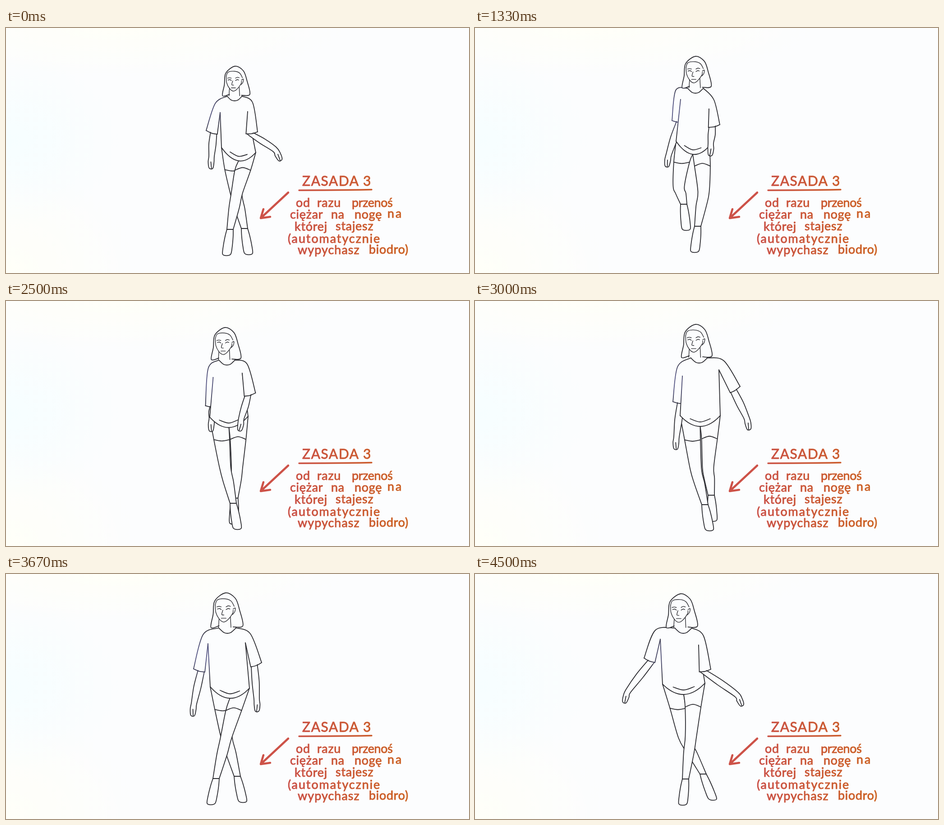
Write an HTML page with a canvas that moves like this. It is 1027 px wide and 545 px high and loops after 4670 ms.

```html
<!DOCTYPE html>
<html lang="pl">
<meta charset="utf-8">
<title>Zasada 3</title>
<style>
html, body { margin: 0; width: 100%; height: 100%; overflow: hidden; }
body {
  background:
    radial-gradient(ellipse 260px 190px at 0 250px, #f6feff, #f6feff00),
    radial-gradient(ellipse 520px 110px at 250px 0, #fffff8, #fffff800),
    radial-gradient(ellipse 300px 240px at 0 545px, #fffff8, #fffff800),
    #fcfdfe;
}
canvas, svg { position: absolute; left: 0; top: 0; width: 1027px; height: 545px; }
text { font: 27px Lato, "Open Sans", sans-serif; }
</style>
<canvas id="stage" width="1027" height="545"></canvas>
<svg viewBox="0 0 1027 545" stroke-linecap="round" stroke-linejoin="round">
  <linearGradient id="ink" gradientUnits="userSpaceOnUse" x1="625" x2="890" y1="0" y2="0">
    <stop stop-color="#ca4f46"/><stop offset="1" stop-color="#cc6222"/>
  </linearGradient>
  <g id="note" fill="url(#ink)" stroke="url(#ink)" stroke-width=".9">
    <path fill="none" stroke-width="3.4" d="M650 361Q730 361 811 359.5"/>
    <path fill="none" stroke="#cd5248" stroke-width="4.6" d="M626 366L566 422M571 403L565 423L586 420"/>
    <text x="657" y="351" style="font-size:30px;letter-spacing:1.6px">ZASADA 3</text>
  </g>
</svg>
<script>
// Joints of the walker in each key pose; pairs run left, right as seen
const joints = 'head neck shoulderL shoulderR cuffL cuffR wristL wristR hemL hemR kneeL kneeR ankleL ankleR'.split(' ');
const poses = [
  '508,85 507,162 464,168 547,166 444,228 558,231 456,285 596,270 478,266 554,277 511,372 512,368 529,446 497,448',
  '494,77 496,154 446,151 540,162 423,216 551,226 408,277 613,240 457,260 537,259 489,360 512,365 515,440 495,446',
  '489,63 489,145 445,139 530,160 437,206 543,215 430,281 523,256 446,252 520,262 452,352 507,365 463,392 494,441',
  '482,66 483,147 448,153 518,148 446,242 519,219 466,222 442,263 449,262 530,258 482,365 508,370 498,447 491,445',
  '489,52 497,138 449,147 552,133 439,224 588,190 447,302 602,259 455,255 544,255 490,375 517,370 510,453 524,432',
  '487,42 491,132 437,135 542,133 416,211 567,197 417,288 556,278 453,251 540,254 489,362 488,365 513,450 466,455',
  '456,44 462,132 400,125 507,138 375,187 523,212 340,260 580,268 416,245 510,243 464,365 479,360 506,445 467,456'
].map(row => parse(row));
const keys = [0, 4, 8, 12, 18, 22, 27];

// Head outlines, relative to the crown
const hair = parse('-12,61 -27,64 -23,40 -20,15 0,0 18,10 26,32 32,61 14,63');
const jaw = parse('-19,22 -18,36 -12,48 -4,54 4,50 13,38 14,32');
const features = [
  '-19,22 -15,13 -1,11 10,15 16,25', '14,30 18,28 17,35 13,40',
  '-16,26 -12,25 -8,26', '1,26 5,24 9,25', '-15,30 -11,29 -8,31', '1,31 5,29 8,30',
  '-5,32 -7,40 -3,41', '-8,47 -4,47 1,47', '-12,48 -13,64', '9,45 10,64'
].map(parse);

const words = [
  [643, 398, 'od'], [690, 398, 'razu'], [767, 398, 'przenoś', -.4],
  [630, 424, 'ciężar'], [721, 424, 'na'], [773, 424, 'nogę'], [846, 422, 'na', 3],
  [640, 451, 'której'], [731, 450, 'stajesz'],
  [625, 478, '(automatycznie', 1.9],
  [647, 503, 'wypychasz', 1], [805, 502, 'biodro)']
];
const note = document.getElementById('note');
for (const [x, y, word, gap = .7] of words) {
  const text = document.createElementNS(note.namespaceURI, 'text');
  text.setAttribute('x', x);
  text.setAttribute('y', y);
  text.style.letterSpacing = gap + 'px';
  text.textContent = word;
  note.append(text);
}

const ctx = document.getElementById('stage').getContext('2d');
const pencil = ctx.createRadialGradient(437, 180, 15, 437, 180, 60);
pencil.addColorStop(0, '#505080');
pencil.addColorStop(1, '#2b2b30');
ctx.strokeStyle = pencil;
ctx.fillStyle = '#fcfdfe';
ctx.lineCap = ctx.lineJoin = 'round';

function parse(s) { return s.split(' ').map(p => p.split(',').map(Number)); }
function mix(a, b, k) { return a.map((v, i) => v + (b[i] - v) * k); }
function move(p, dir, k = 1) { return p.map((v, i) => v + dir[i] * k); }
function unit(a, b) {
  const d = move(b, a, -1), n = Math.hypot(...d) || 1;
  return d.map(v => v / n);
}

// Smooth curve through all points
function curve(p) {
  let d = 'M' + p[0];
  for (let i = 1; i < p.length; i++) {
    const a = p[i - 2] || p[i - 1], b = p[i - 1], c = p[i], e = p[i + 1] || c;
    d += `C${move(b, move(c, a, -1), 1 / 6)} ${move(c, move(e, b, -1), -1 / 6)} ${c}`;
  }
  return new Path2D(d);
}
const line = (...p) => ctx.stroke(curve(p));
const cover = p => ctx.fill(new Path2D('M' + p.join('L') + 'Z'));
function solid(p) { ctx.fill(curve(p)); line(...p); }

function drawLeg(side, hem, crotch, hip, knee, ankle) {
  const thigh = mix(hip, knee, .45), calf = mix(knee, ankle, .4);
  const edge = s => [s === side ? hem : crotch,
    move(thigh, [s, 0], 17.5), move(knee, [s, 0], 12.5), move(calf, [s, 0], 11.5), move(ankle, [s, 0], 7)];
  const left = edge(-1), right = edge(1);
  cover([...left, ...[...right].reverse()]);
  line(...left);
  line(...right);
  line(left[1], move(thigh, [0, side > 0 ? -6 : 3]), right[1]);

  const step = [(ankle[0] - knee[0]) / 2, 55];
  const sole = [[0, 7], [.3, 9], [.7, 10], [1, 9]];
  const rim = s => sole.map(([k, w]) => move(move(ankle, step, k), [s, 0], w));
  solid([...rim(-1), move(ankle, step, 1.06), ...rim(1).reverse()]);
  line(left[4], right[4]);
}

function drawArm(side, collar, shoulder, armpit, cuff, wrist) {
  const inward = d => [-side * d[1], side * d[0]];
  const inner = move(cuff, inward(unit(shoulder, cuff)), 26);
  const start = mix(inner, cuff, .6), end = mix(inner, cuff, .05);
  const dir = unit(mix(start, end, .5), wrist), across = inward(dir);
  const w1 = move(wrist, across, -6), w2 = move(wrist, across, 6);
  // The hand hangs halfway between the forearm's direction and straight down
  const drop = unit([0, 0], move(dir, [0, 1])), wide = inward(drop);
  const palm = move(wrist, drop, 13), tip = move(wrist, drop, 27);
  solid([start, move(mix(start, w1, .5), across, -2), w1,
    move(palm, wide, -7), move(tip, wide, -4), move(tip, wide, 4), move(palm, wide, 6),
    w2, move(mix(w2, end, .5), across, 1), end]);
  line(move(palm, wide, -1), move(tip, wide, 1));

  cover([collar, shoulder, cuff, inner, armpit]);
  line(collar, shoulder, cuff);
  line(cuff, move(mix(cuff, inner, .5), [0, 2]), inner);
  line(inner, armpit);
}

function drawHead(head, size) {
  const place = pts => pts.map(p => move(head, p, size));
  solid(place(hair));
  ctx.lineWidth = 1.4;
  solid(place(jaw));
  for (const f of features) line(...place(f));
}

function draw(frame) {
  const k = Math.max(0, keys.findIndex(f => f >= frame) - 1);
  const part = (frame - keys[k]) / (keys[k + 1] - keys[k]);
  const j = {};
  joints.forEach((name, i) => j[name] = mix(poses[k][i], poses[k + 1][i], part));
  const { head, neck, hemL, hemR } = j;
  const size = (neck[1] - head[1]) / 75;
  const hemAt = (t, up = 0) => move(mix(hemL, hemR, t), [0, 96 * t * (1 - t) - up]);
  const collar = s => move(neck, [s * 16, -10], size);
  const armpit = s => move(j[s < 0 ? 'shoulderL' : 'shoulderR'], [-s * 11, 20]);
  const arm = (s, n) => drawArm(s, collar(s), j['shoulder' + n], armpit(s), j['cuff' + n], j['wrist' + n]);
  const leg = (s, n) => drawLeg(s, j['hem' + n], hemAt(.5), mix(hemL, hemR, .5 + s * .26), j['knee' + n], j['ankle' + n]);

  ctx.clearRect(0, 0, 1027, 545);
  ctx.lineWidth = 1.8;
  // The leg with the lower ankle is nearer
  const legs = [[-1, 'L'], [1, 'R']].sort((a, b) => j['ankle' + a[1]][1] - j['ankle' + b[1]][1]);
  for (const [s, n] of legs) leg(s, n);
  arm(-1, 'L');

  const hem = Array.from({ length: 9 }, (_, i) => hemAt(i / 8));
  cover([collar(-1), armpit(-1), ...hem, armpit(1), collar(1)]);
  line(armpit(-1), hemL);
  line(armpit(1), hemR);
  line(...hem);
  line(hemAt(.25, 11), hemAt(.5, 10), hemAt(.75, 11));
  arm(1, 'R');
  drawHead(head, size);
  ctx.lineWidth = 1.8;
  line(collar(-1), move(neck, [-8, -2]), neck, move(neck, [8, -2]), collar(1));
}

let shown = -1;
function tick() {
  const t = Math.floor(performance.now() % 4670 / 10) * 10;
  const frame = Math.floor((t + 4) * 6 / 1000);
  if (frame !== shown) draw(shown = frame);
  requestAnimationFrame(tick);
}
tick();
</script>
</html>
```
